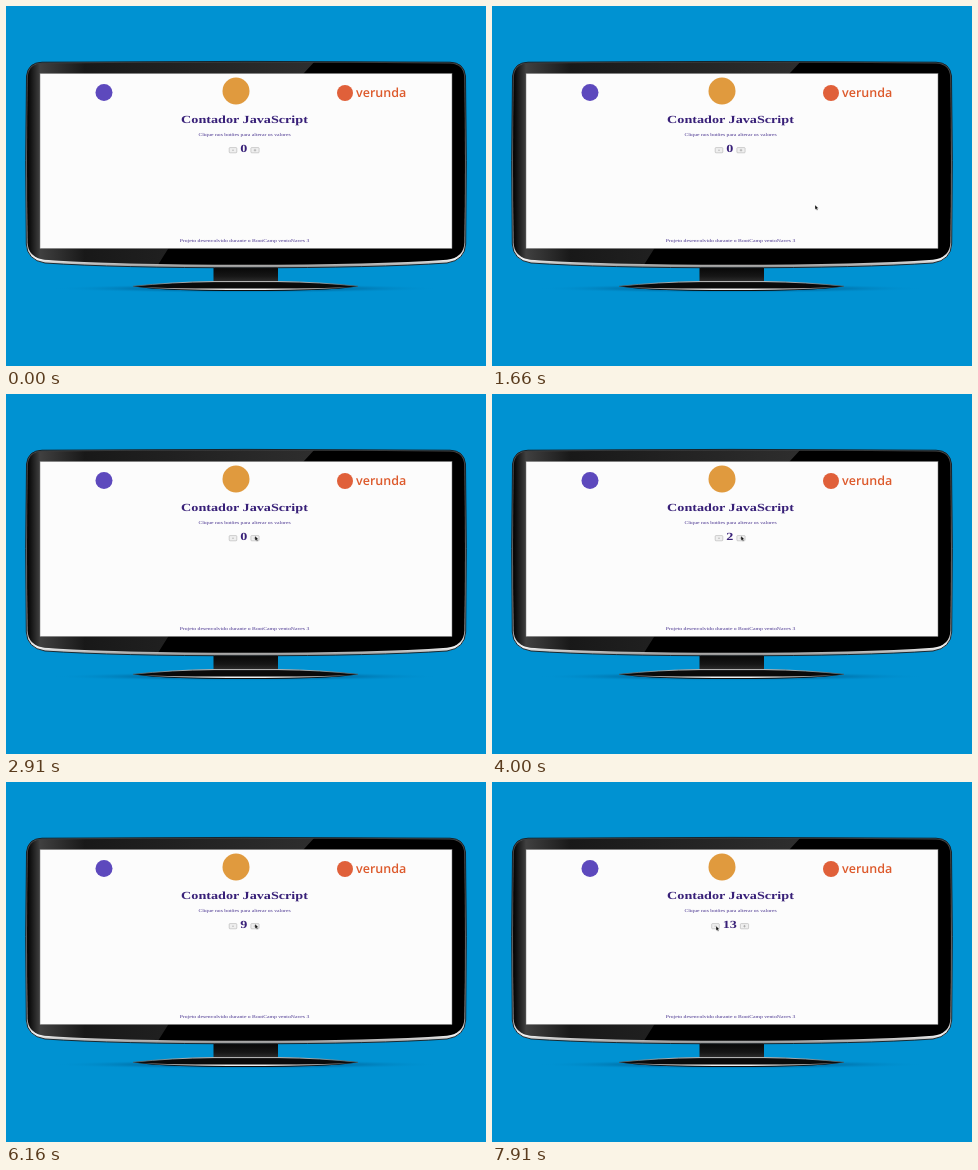
These frames come from a looping animation (480 px wide and 360 px high, 8000 ms). An HTML page:

```html
<!DOCTYPE html>
<html lang="pt-BR">
<head>
<meta charset="utf-8">
<title>Contador JavaScript</title>
<style>
  html, body { margin: 0; width: 100%; height: 100%; overflow: hidden; background: #0092d2; }
  svg { display: block; width: 100vw; height: 100vh; }
  text { text-rendering: geometricPrecision; }
  .page { font-family: "Liberation Serif", "Times New Roman", serif; fill: #382078; text-anchor: middle; }
  .big { font-size: 10.9px; font-weight: 700; }
  .small { font-size: 4.38px; fill: #4a3590; }
  .brand { font: 600 12.5px "Open Sans", sans-serif; fill: #dd5a2c; }
  .button rect { fill: #efefef; stroke: #a5a5a5; stroke-width: .5; }
  .button path { fill: none; stroke: #888; stroke-width: .5; }
</style>
</head>
<body>
<svg viewBox="0 0 480 360" preserveAspectRatio="none">
  <defs>
    <linearGradient id="rim" x2="0" y2="1">
      <stop offset="0" stop-color="#4a4a4a"/>
      <stop offset=".5" stop-color="#707070"/>
      <stop offset=".88" stop-color="#b5b5b5"/>
      <stop offset=".96" stop-color="#f2f2f2"/>
      <stop offset="1" stop-color="#8a8a8a"/>
    </linearGradient>
    <linearGradient id="gloss" gradientUnits="userSpaceOnUse" x1="21" x2="310" y1="0" y2="0">
      <stop offset="0" stop-color="#999" stop-opacity="0"/>
      <stop offset=".045" stop-color="#999" stop-opacity=".42"/>
      <stop offset=".2" stop-color="#999" stop-opacity=".16"/>
      <stop offset="1" stop-color="#999" stop-opacity=".3"/>
    </linearGradient>
    <linearGradient id="neck" x2="0" y2="1">
      <stop offset="0" stop-color="#050505"/>
      <stop offset=".6" stop-color="#161616"/>
      <stop offset="1" stop-color="#333"/>
    </linearGradient>
    <linearGradient id="shine">
      <stop offset="0" stop-color="#555"/>
      <stop offset=".3" stop-color="#eee"/>
      <stop offset=".7" stop-color="#eee"/>
      <stop offset="1" stop-color="#555"/>
    </linearGradient>
    <radialGradient id="shade">
      <stop offset="0" stop-color="#003a60" stop-opacity=".5"/>
      <stop offset=".6" stop-color="#004a78" stop-opacity=".3"/>
      <stop offset="1" stop-color="#0092d2" stop-opacity="0"/>
    </radialGradient>
    <path id="face" d="M36 57.4Q240 55.8 444 57.4Q456.8 57.8 458.2 70Q459.6 155 458.4 237Q457.8 251.5 441 253.8Q370 258.8 240 258.8Q110 258.8 39 253.8Q22.2 251.5 21.6 237Q20.4 155 21.8 70Q23.2 57.8 36 57.4Z"/>
    <clipPath id="bezel"><use href="#face"/></clipPath>
  </defs>

  <rect width="480" height="360" fill="#0092d2"/>
  <ellipse cx="240" cy="282.5" rx="194" ry="4.5" fill="url(#shade)"/>

  <!-- stand -->
  <path d="M207.5 260H272V277H207.5Z" fill="url(#neck)"/>
  <path d="M127 280.3Q165 276 208 275.2H272Q315 276 352 280.3Q330 285 240 285Q150 285 127 280.3Z" fill="#0a0a0a"/>
  <path d="M127 280.3Q165 276 208 275.6H272Q315 276 352 280.3" fill="none" stroke="url(#shine)" stroke-width=".8"/>
  <path d="M129 280.7Q165 282.6 240 282.6Q315 282.6 350 280.7Q315 284 240 284Q165 284 129 280.7Z" fill="url(#shine)"/>

  <!-- monitor -->
  <path d="M36 56.2Q240 54.6 444 56.2Q458 56.5 459.5 70Q461 155 459.7 238Q459 254 441 257Q370 261.8 240 261.8Q110 261.8 39 257Q21 254 20.3 238Q19 155 20.5 70Q22 56.5 36 56.2Z" fill="url(#rim)" stroke="#151b20" stroke-width=".9"/>
  <use href="#face"/>
  <path d="M18 54H310L298 67L162 243L150 262H18Z" fill="url(#gloss)" clip-path="url(#bezel)"/>
  <rect x="34" y="67.5" width="412" height="175" fill="#fcfcfc" stroke="#777" stroke-width=".5"/>

  <!-- web page -->
  <circle cx="98" cy="86.5" r="8.5" fill="#5d49bd"/>
  <circle cx="230" cy="85" r="13.5" fill="#e09a3e"/>
  <circle cx="339" cy="87" r="8" fill="#e0603a"/>
  <text class="brand" x="350" y="90.7">verunda</text>
  <g class="page" transform="translate(238.5 0) scale(1.3 1)">
    <text class="big" y="116.6">Contador JavaScript</text>
    <text class="small" y="130">Clique nos botões para alterar os valores</text>
    <text class="big" id="count" x="-.5" y="145.6">0</text>
    <text class="small" y="235.5">Projeto desenvolvido durante o BootCamp ventoNaves 3</text>
  </g>
  <g class="button" id="minus">
    <rect x="-3.8" y="-2.6" width="7.6" height="5.2" rx=".8"/>
    <path d="M-1 0H1"/>
  </g>
  <g class="button" id="plus">
    <rect x="-4.1" y="-2.6" width="8.2" height="5.2" rx=".8"/>
    <path d="M-1.3 0H1.3M0 -1.3V1.3"/>
  </g>
  <path id="cursor" d="M0 0V4.6L1.1 3.7L1.9 5.3L2.8 4.9L2.1 3.3H3.5Z" fill="#111" stroke="#eee" stroke-width=".35"/>
</svg>
<script>
  const LOOP = 8000, FPS = 12;
  const FIRST_CLICK = 3400, CLICK_GAP = 330, MAX = 13;
  // time, x, y
  const path = [
    [1160, 338, 238], [1600, 323, 199], [1840, 323, 199],
    [2480, 249, 142], [7420, 249, 142], [7800, 224, 144]
  ];
  const get = id => document.getElementById(id);
  const [count, minus, plus, cursor] = ['count', 'minus', 'plus', 'cursor'].map(get);
  const place = (el, x, y) => el.setAttribute('transform', `translate(${x} ${y})`);
  const ease = p => p * p * (3 - 2 * p);

  function cursorAt(t) {
    const i = path.findIndex(k => k[0] > t);
    if (i < 0) return path[path.length - 1].slice(1);
    const [a, b] = [path[i - 1], path[i]];
    const p = ease((t - a[0]) / (b[0] - a[0]));
    return [a[1] + (b[1] - a[1]) * p, a[2] + (b[2] - a[2]) * p];
  }

  function draw(ms) {
    const t = Math.floor((ms + 10) * FPS / 1000) * 1000 / FPS % LOOP;
    const clicks = Math.floor((t - FIRST_CLICK) / CLICK_GAP) + 1;
    const value = Math.max(0, Math.min(MAX, clicks));
    const shift = value > 9 ? 3.5 : 0;
    count.textContent = value;
    place(minus, 227 - shift, 144.2);
    place(plus, 249 + shift, 144.2);
    const shown = t >= path[0][0];
    cursor.style.display = shown ? '' : 'none';
    if (shown) place(cursor, ...cursorAt(t));
  }

  const start = performance.now();
  function tick() {
    draw((performance.now() - start) % LOOP);
    requestAnimationFrame(tick);
  }
  tick();
</script>
</body>
</html>
```
